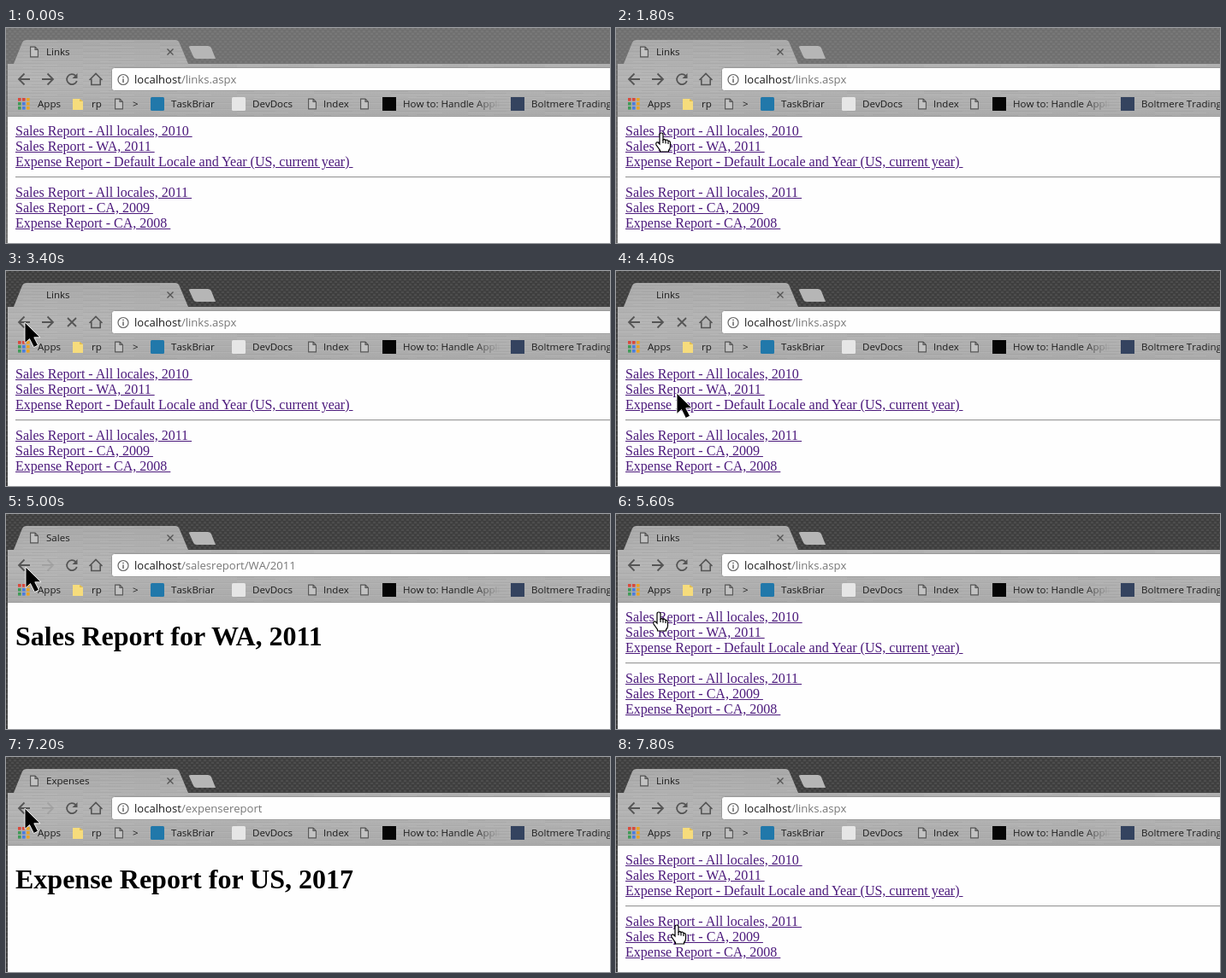
These frames come from a looping animation (706x252 px, 8000 ms). An HTML page:

```html
<!DOCTYPE html>
<html lang="en">
<head>
<meta charset="utf-8">
<title>Links</title>
<style>
html, body { margin: 0; width: 100%; height: 100%; overflow: hidden; background: #fff; }
#stage { position: absolute; left: 0; top: 0; width: 706px; height: 252px; overflow: hidden; font-kerning: none; }
svg { position: absolute; left: 0; top: 0; }
.ui { font-family: "Open Sans", "Noto Sans", sans-serif; font-size: 11.55px; fill: #1c1c1c; }
#address { font-size: 13.1px; }
#path { fill: #777; }
.line { fill: none; stroke: #555; stroke-width: 1.8; }
.doc { fill: #c2c2c2; stroke: #555; stroke-width: 1.1; }
.off { opacity: .18; }
#page { position: absolute; left: 11px; top: 104px; width: 800px; height: 148px;
  font: 16px/18px "Liberation Serif", "Times New Roman", serif; color: #000; }
#links { padding-top: 8px; }
#links a { display: block; width: max-content; white-space: pre; color: #4c1a7c; text-decoration: underline; }
#links hr { margin: 8px 0; border: solid; border-width: 1px 0; border-color: #9a9a9a transparent #ededed; }
h1 { margin: 21.4px 0 0; font-size: 32px; line-height: 37px; white-space: nowrap; }
</style>
</head>
<body>
<div id="stage">
  <svg width="706" height="252">
    <defs>
      <pattern id="weave" width="6" height="6" patternUnits="userSpaceOnUse">
        <rect width="6" height="6" fill="#414141"/>
        <path d="M0 1h3M3 4h3" stroke="#515151" stroke-width="1.6"/>
        <path d="M0 3h3M3 0h3" stroke="#383838"/>
      </pattern>
      <pattern id="brush" width="90" height="7" patternUnits="userSpaceOnUse">
        <path d="M0 1.5h60M20 4.5h70" stroke="#fff" stroke-opacity=".07"/>
        <path d="M30 3.5h60M0 6.5h45" stroke="#000" stroke-opacity=".03"/>
      </pattern>
      <linearGradient id="metal" gradientUnits="userSpaceOnUse" x1="0" y1="14" x2="0" y2="104">
        <stop stop-color="#a8a8a8"/><stop offset=".5" stop-color="#b4b4b4"/><stop offset="1" stop-color="#aaa"/>
      </linearGradient>
      <linearGradient id="fade" gradientUnits="userSpaceOnUse" x1="545" y1="0" x2="578" y2="0">
        <stop stop-color="#1c1c1c"/><stop offset="1" stop-color="#1c1c1c" stop-opacity="0"/>
      </linearGradient>
      <path id="doc" class="doc" d="M-4.4 -5.9H1L4.4 -2.5V5.9H-4.4ZM1 -5.9V-2.5H4.4"/>
    </defs>

    <rect width="706" height="252" fill="url(#weave)"/>
    <rect id="inactive" width="706" height="252" fill="#b8b8b8" fill-opacity=".4"/>
    <rect x="2" y="104" width="704" height="148" fill="#fefefe"/>
    <path id="shell" fill="url(#metal)" d="M2 104V42H9L19 17Q20.500 14 24 14H198Q201 14 202.500 17L213 42H706V104Z"/>
    <path fill="url(#brush)" d="M2 104V42H9.500L20 15H201L213 42H706V104Z"/>
    <path d="M2 103.500H706" stroke="#989898"/>
    <path d="M216 21H236Q239 21 240 23.500L245 36H223Q220 36 219 33.500L214 22.500Q213.500 21 216 21Z" fill="#b6b6b6"/>

    <g class="ui">
      <use id="favicon" href="#doc" x="33" y="28"/>
      <path id="spinner" d="M36 23A6 6 0 0 1 37 32.500" fill="none" stroke="#5b86d8" stroke-width="1.5"/>
      <text id="title" x="47" y="32"></text>
      <path class="line" d="M188.500 24.500l7 7m0-7l-7 7" style="stroke-width:1.4"/>

      <path class="line" d="M28 60H15.500M21.500 53.500L15 60L21.500 66.500"/>
      <path class="line" id="forward" d="M42 60H54.500M48.500 53.500L55 60L48.500 66.500"/>
      <g id="reload">
        <path class="line" d="M81.500 56A6 6 0 1 0 82.800 62"/>
        <path d="M83.500 53V59H77.500Z" fill="#555"/>
      </g>
      <path class="line" id="stop" d="M72 55l10 10m0-10l-10 10"/>
      <path class="line" d="M97.500 61L105 53.500L112.500 61M99.800 59.500V66.500H110.200V59.500" style="stroke-width:1.6"/>

      <rect x="123.500" y="46.500" width="600" height="27" rx="3" fill="#fefefe" stroke="#999"/>
      <circle cx="137" cy="60.500" r="6" fill="none" stroke="#666" stroke-width="1.2"/>
      <path d="M137 59.500v4.500M137 56.700v1.600" stroke="#666" stroke-width="1.5"/>
      <text id="address" x="150" y="65">localhost<tspan id="path"></tspan></text>

      <g id="apps"></g>
      <path d="M78 83H86L90 86V96H78Z" fill="#f6dc7c"/>
      <path d="M86 83V86H90" fill="#e3bd4b"/>
      <use href="#doc" x="132" y="89"/>
      <rect x="169" y="81" width="16" height="16" rx="1.500" fill="#2178aa"/>
      <rect x="264" y="81" width="16" height="16" rx="1.500" fill="#e6e6e6"/>
      <use href="#doc" x="358" y="89"/>
      <use href="#doc" x="419" y="89"/>
      <rect x="440" y="81" width="16" height="16" fill="#050505"/>
      <rect x="590" y="81" width="16" height="16" fill="#34435f"/>
      <text x="37" y="93">Apps</text>
      <text x="100" y="93">rp</text>
      <text x="148" y="93">&gt;</text>
      <text x="193" y="93">TaskBriar</text>
      <text x="288" y="93">DevDocs</text>
      <text x="371" y="93">Index</text>
      <text x="464" y="93" fill="url(#fade)">How to: Handle Appli</text>
      <text x="614" y="93">Boltmere Trading -</text>
    </g>
  </svg>

  <div id="page">
    <div id="links">
      <a>Sales Report - All locales, 2010 </a>
      <a>Sales Report - WA, 2011 </a>
      <a>Expense Report - Default Locale and Year (US, current year) </a>
      <hr>
      <a>Sales Report - All locales, 2011 </a>
      <a>Sales Report - CA, 2009 </a>
      <a>Expense Report - CA, 2008 </a>
    </div>
    <h1 id="heading"></h1>
  </div>

  <svg width="706" height="252">
    <g id="cursor">
      <path id="arrow" d="M0 0V24.500L5.500 19.500L10.500 29.500L15.500 27L10.800 17.800H18Z" fill="#000" stroke="#fff" stroke-width=".9"/>
      <g id="hand" stroke="#000" stroke-width="1.2">
        <path fill="#fff" d="M-2 13V2Q-2 0 0 0T2 2V8Q3.500 6.800 5 8.500Q7 7.500 8 9.500Q10.500 9 10.500 12V16Q10.500 18.500 8.500 20.500V22H-1.500V20.500L-6 14Q-7 10.500 -4 11Z"/>
        <path fill="none" d="M2 8v4M5 8.500v4M8 9.500v3.500"/>
      </g>
      <path id="beam" d="M-4.500 -10.500H-1.500L0 -9.500L1.500 -10.500H4.500M0 -9.500V9.500M-4.500 10.500H-1.500L0 9.500L1.500 10.500H4.500" fill="none" stroke="#000" stroke-width="1.7"/>
    </g>
  </svg>
</div>

<script>
const LOOP = 8000, STEP = 200;
const el = id => document.getElementById(id);
const show = (id, on) => { el(id).style.display = on ? '' : 'none'; };

const LINKS = { title: 'Links', path: '/links.aspx' };
const SALES = { title: 'Sales', path: '/salesreportsummary/2010', heading: 'Sales Report for All locales, 2010' };
const STATE = { title: 'Sales', path: '/salesreport/WA/2011', heading: 'Sales Report for WA, 2011' };
const PENDING = { title: 'localhost/expensereport', path: '/expensereport' };
const EXPENSE = { title: 'Expenses', path: '/expensereport', heading: 'Expense Report for US, 2017' };

// time, view, load phase (0 idle, 1 waiting, 2 spinning), forward enabled
const views = [
  [0, LINKS, 0, true], [2000, LINKS, 1, true],
  [2200, SALES, 2, false], [2400, SALES, 0, false],
  [3400, LINKS, 1, true], [3600, LINKS, 0, true], [4400, LINKS, 1, true],
  [4600, STATE, 2, false], [4800, STATE, 0, false],
  [5200, LINKS, 1, true], [5400, LINKS, 0, true],
  [6600, PENDING, 1, false], [6800, EXPENSE, 2, false], [7000, EXPENSE, 0, false],
  [7400, LINKS, 1, true], [7600, LINKS, 0, true]
];

// time, x, y, shape
const moves = [
  [0, 560, 300, 'arrow'], [400, 420, 238, 'arrow'], [800, 190, 180, 'arrow'],
  [1200, 66, 130, 'hand'], [1800, 53, 123, 'hand'], [2000, 51, 128, 'arrow'],
  [2200, 51, 130, 'beam'], [2400, 51, 130, 'beam'], [2600, 45, 105, 'arrow'],
  [3000, 22, 60, 'arrow'], [3400, 22, 60, 'arrow'], [3600, 36, 90, 'arrow'],
  [3800, 62, 130, 'hand'], [4000, 71, 141, 'hand'], [4400, 71, 143, 'arrow'],
  [4600, 68, 138, 'arrow'], [4800, 24, 64, 'arrow'], [5200, 22, 60, 'arrow'],
  [5400, 34, 82, 'arrow'], [5600, 50, 115, 'hand'], [6000, 64, 155, 'hand'],
  [6400, 64, 155, 'hand'], [6600, 60, 130, 'arrow'], [6800, 36, 84, 'arrow'],
  [7000, 22, 60, 'arrow'], [7400, 22, 60, 'arrow'], [7600, 56, 150, 'hand'],
  [7800, 71, 197, 'hand']
];

const lastAt = (list, t) => list.findLastIndex(item => item[0] <= t);

const appColors = ['#d9483b', '#d9483b', '#e9a325', '#3f9b57', '#4a7de0', '#e9a325', '#3f9b57', '#4a7de0', '#e9a325'];
el('apps').innerHTML = appColors.map((color, i) =>
  `<rect x="${14 + i % 3 * 5}" y="${82 + Math.floor(i / 3) * 5}" width="3.6" height="3.6" fill="${color}"/>`).join('');

function drawView(t) {
  const [, view, phase, canForward] = views[lastAt(views, t)];
  el('title').textContent = view.title;
  el('path').textContent = view.path;
  el('heading').textContent = view.heading || '';
  show('links', !view.heading);
  show('heading', view.heading);
  show('favicon', phase === 0);
  show('spinner', phase === 2);
  show('reload', phase === 0);
  show('stop', phase > 0);
  show('inactive', t < 2000);
  el('forward').classList.toggle('off', !canForward);
}

function drawCursor(t) {
  const i = lastAt(moves, t);
  const [t0, x0, y0, shape] = moves[i];
  const [t1, x1, y1] = moves[i + 1] || [LOOP, x0, y0];
  const k = (t - t0) / (t1 - t0);
  el('cursor').setAttribute('transform', `translate(${x0 + (x1 - x0) * k} ${y0 + (y1 - y0) * k})`);
  for (const name of ['arrow', 'hand', 'beam']) show(name, name === shape);
}

let drawn = -1;
function tick() {
  const t = Math.floor(performance.now() % LOOP / STEP) * STEP;
  if (t !== drawn) {
    drawn = t;
    drawView(t);
    drawCursor(t);
  }
  requestAnimationFrame(tick);
}
tick();
</script>
</body>
</html>
```
